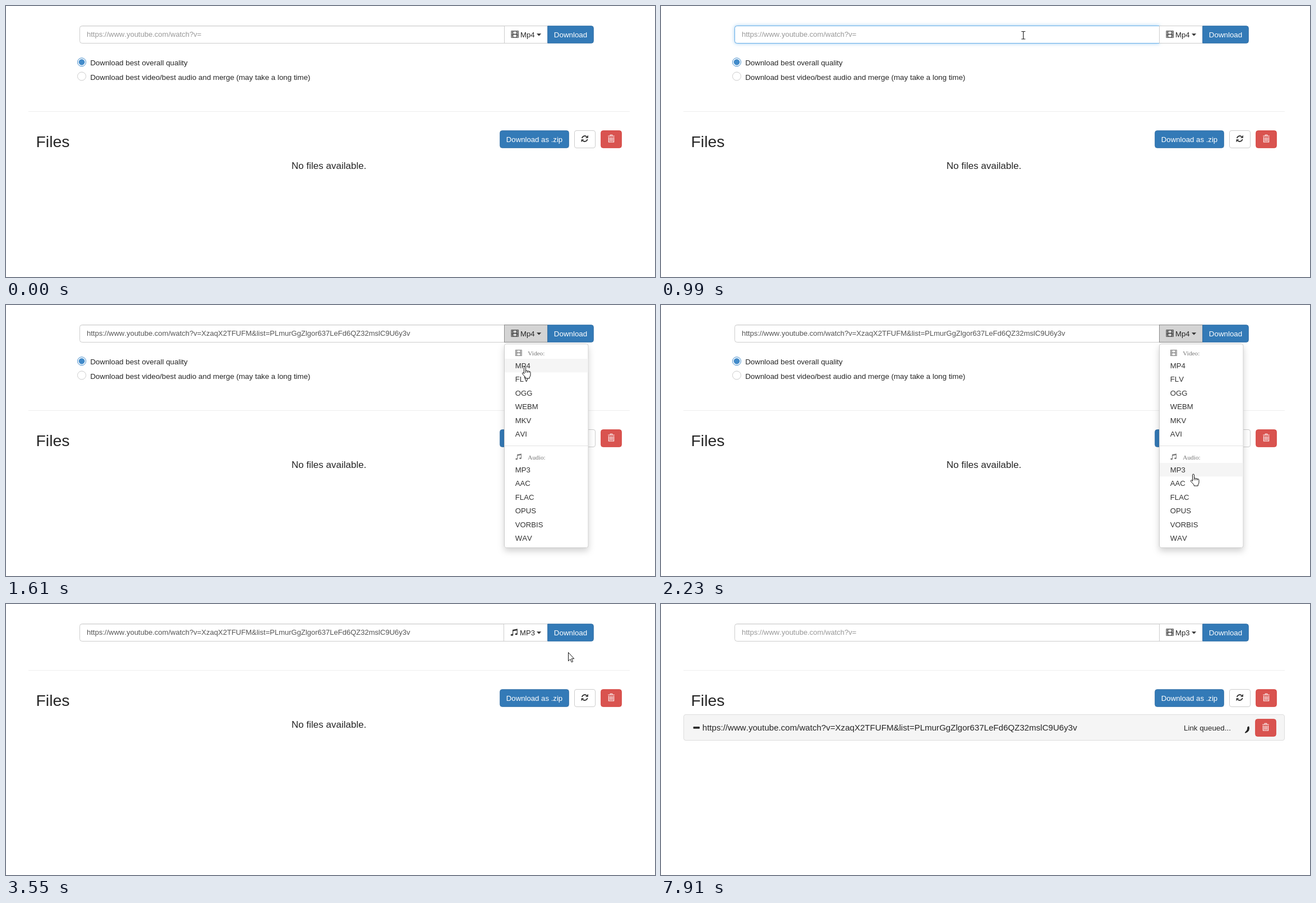
Animation, 1157 px wide and 484 px high, one loop 7.99 s. Source, as an HTML page:

```html
<!DOCTYPE html>
<html lang="en">
<head>
<meta charset="utf-8">
<title>Video downloader</title>
<style>
html, body { margin: 0; width: 100%; height: 100%; overflow: hidden; background: #fff; }
svg { display: block; width: 1157px; height: 484px; }
text { font: 13.35px "Liberation Sans", Arial, sans-serif; font-kerning: none; fill: #262626; white-space: pre; }
.mid { text-anchor: middle; }
.light { fill: #fff; }
.field { font-size: 13.03px; fill: #555; }
.field.hint { fill: #999; }
.btn { fill: #fff; stroke: #ccc; }
.btn.hover { fill: #e6e6e6; stroke: #adadad; }
.btn.open { fill: #d4d4d4; stroke: #8c8c8c; }
.primary { fill: #337ab7; stroke: #2e6da4; }
.primary.hover { fill: #286090; stroke: #204d74; }
.primary.focus { fill: #286090; stroke: #122b40; }
.danger { fill: #d9534f; stroke: #d43f3a; }
.item { font-size: 13.16px; fill: #333; }
.head { font: 11.3px "Liberation Serif", "Times New Roman", serif; fill: #777; }
.pointer { fill: #fff; stroke: #111; stroke-linejoin: round; }
</style>
</head>
<body>
<svg viewBox="0 0 1157 484">
  <defs>
    <filter id="glow" filterUnits="userSpaceOnUse" x="110" y="15" width="800" height="75">
      <feDropShadow dx="0" dy="0" stdDeviation="3.4" flood-color="#66afe9" flood-opacity=".65"/>
    </filter>
    <filter id="shade" filterUnits="userSpaceOnUse" x="860" y="50" width="210" height="430">
      <feDropShadow dx="0" dy="5.6" stdDeviation="5.6" flood-opacity=".175"/>
    </filter>
    <path id="box" d="M888.5 35.5H135.5q-4 0-4 4V62.5q0 4 4 4H888.5z"/>
    <path id="film" fill-rule="evenodd" d="M0 0H14V13H0zM4 1.2H10V5.8H4zM4 7.2H10V11.8H4zM1 1.2h1.8v1.8h-1.8zM1 4.2h1.8v1.8h-1.8zM1 7.2h1.8v1.8h-1.8zM1 10.2h1.8v1.8h-1.8zM11.2 1.2h1.8v1.8h-1.8zM11.2 4.2h1.8v1.8h-1.8zM11.2 7.2h1.8v1.8h-1.8zM11.2 10.2h1.8v1.8h-1.8z"/>
    <g id="music">
      <path d="M3.7 1.8 13 0V10H11.8V3.1L4.9 4.4V11.5H3.7z"/>
      <ellipse cx="2.6" cy="11.4" rx="2.3" ry="1.6"/>
      <ellipse cx="10.7" cy="9.9" rx="2.3" ry="1.6"/>
    </g>
    <g id="trash">
      <rect x=".75" y=".75" width="36.5" height="30.5" rx="3.5" class="danger"/>
      <g fill="none" stroke="#fff" stroke-width="1.1">
        <path d="M17.2 9.6V8.3H20.8V9.6M13.2 10.2H24.8"/>
        <path d="M14.4 12V21H23.6V12M16.8 12.5V19.6M19 12.5V19.6M21.2 12.5V19.6"/>
      </g>
    </g>
  </defs>

  <use href="#box" fill="#fff" stroke="#ccc"/>
  <path d="M134 36.5H888" stroke="#000" stroke-opacity=".05"/>
  <use href="#box" id="focus" fill="#fff" stroke="#66afe9" filter="url(#glow)"/>
  <text id="url" class="field" x="144" y="55.3"></text>
  <path id="caret" d="M721.5 43V58.5" stroke="#222"/>

  <rect id="format" class="btn" y="35.5" height="31"/>
  <use id="icon" fill="#333"/>
  <text id="kind" y="55.7" style="font-size:13.1px"></text>
  <path d="M946 49.3H954.2L950.1 53.5z" fill="#333"/>
  <path id="get" class="primary" d="M965.75 35.75H1043.75q3.5 0 3.5 3.5V62.75q0 3.5-3.5 3.5H965.75z"/>
  <text class="mid light" x="1006.5" y="55.7">Download</text>

  <g id="options">
    <circle cx="135" cy="100.3" r="7.5" fill="#fff" stroke="#428bca"/>
    <circle cx="135" cy="100.3" r="5.4" fill="#428bca"/>
    <circle cx="135" cy="125.5" r="7.5" fill="#fff" stroke="#ccc"/>
    <text x="150.2" y="106">Download best overall quality</text>
    <text x="150.2" y="131.5">Download best video/best audio and merge (may take a long time)</text>
  </g>

  <g id="files">
    <path d="M40 188.5H1112" stroke="#eee"/>
    <text x="53.5" y="252.4" style="font-size:28.4px">Files</text>
    <rect id="zip" class="primary" x="880.75" y="222.75" width="122.5" height="30.5" rx="3.5"/>
    <text class="mid light" x="942" y="242.5" style="font-size:13.2px">Download as .zip</text>
    <rect class="btn" x="1013.5" y="222.5" width="37" height="31" rx="3.5"/>
    <g transform="translate(1031.7 237)" fill="#333">
      <path d="M-4.8-.8A4.9 4.9 0 0 1 3.4-3.6M4.8.8A4.9 4.9 0 0 1-3.4 3.6" fill="none" stroke="#333" stroke-width="1.8"/>
      <path d="M6.2-6.2V-1.2H1.2zM-6.2 6.2V1.2H-1.2z"/>
    </g>
    <use href="#trash" x="1060" y="222"/>
    <text id="none" x="509" y="291.2" style="font-size:17.05px">No files available.</text>
  </g>

  <g id="queue">
    <rect x="40.5" y="197.5" width="1071" height="46" rx="3.5" fill="#f5f5f5" stroke="#ddd"/>
    <rect x="57.5" y="219" width="11.5" height="3.8" rx="1" fill="#2b2b2b"/>
    <text id="link" x="73.8" y="226.3" style="font-size:15.08px"></text>
    <text x="932" y="225.7">Link queued...</text>
    <path d="M1048.3 218.5Q1051.5 227 1041.5 230.8Q1040 229.5 1042 228Q1045.5 225 1045.2 220.5Q1046 218 1048.3 218.5z" fill="#222"/>
    <use href="#trash" x="1059" y="205"/>
  </g>

  <g id="menu">
    <rect x="888.5" y="69.5" width="149.5" height="364" rx="3.5" fill="#fff" stroke="#ccc" filter="url(#shade)"/>
    <rect id="row" x="889" width="148.5" height="24.4" fill="#f5f5f5"/>
    <path d="M889 251.5H1037.5" stroke="#e2e2e2"/>
    <use href="#film" transform="translate(908 80) scale(.84)" fill="#777"/>
    <use href="#music" transform="translate(908 265.5) scale(.84)" fill="#777"/>
    <text class="head" x="930.3" y="90">Video:</text>
    <text class="head" x="930.3" y="276">Audio:</text>
  </g>

  <g id="cursor">
    <path id="arrow" class="pointer" d="M.5.5V15.8L4 12.6 6.3 17.9 8.6 16.9 6.3 11.7H10.8z"/>
    <path id="hand" class="pointer" d="M-1.5 13V1.6a1.5 1.5 0 0 1 3 0V7.5q1.5-1.2 3 .6q1.6-1 2.8.6q2.4-.6 2.7 1.6V15q0 2-1.7 4v2H1.2V19.2L-4.4 13q-.6-2 1-2.2q1 0 1.9 1.2zM1.5 7.5V11M4.5 8.1V11M7.3 8.7V11"/>
    <path id="beam" d="M-3.5-6.5H-1Q0-6.5 0-5.5Q0-6.5 1-6.5H3.5M0-5.5V6M-3.5 7H-1Q0 7 0 6Q0 7 1 7H3.5" fill="none" stroke="#222" stroke-width="1.2"/>
  </g>
</svg>
<script>
const LOOP = 7990;
const HINT = 'https://www.youtube.com/watch?v=';
const LINK = HINT + 'XzaqX2TFUFM&list=PLmurGgZlgor637LeFd6QZ32mslC9U6y3v';
const ROW = 24.4;
const GROUPS = [[96, 'MP4 FLV OGG WEBM MKV AVI'], [282, 'MP3 AAC FLAC OPUS VORBIS WAV']];
// Moments of the story, in ms
const FOCUS = 830, PASTE = 1055, OPEN = 1400, PICK = 2925, PRESS = 3775, LEAVE = 3955, GONE = 4025, QUEUED = 7905;
// Pointer route: time, x, y
const ROUTE = [
  [200, 1133, 255], [588, 738, 64], [820, 640, 52], [1050, 648, 52], [1207, 910, 56],
  [1390, 911, 56], [1827, 941, 176], [2215, 949, 302], [2925, 949, 302], [3067, 951, 300],
  [3690, 1012, 46]
];

const el = {};
document.querySelectorAll('[id]').forEach(n => el[n.id] = n);
const show = (n, on) => n.style.display = on ? '' : 'none';
const clamp = v => Math.max(0, Math.min(1, v));
const within = (p, x, y, w, h) => p.x >= x && p.x < x + w && p.y >= y && p.y < y + h;

el.link.textContent = LINK;
for (const [top, names] of GROUPS) {
  names.split(' ').forEach((name, i) => {
    const label = document.createElementNS('http://www.w3.org/2000/svg', 'text');
    label.setAttribute('class', 'item');
    label.setAttribute('x', 907.8);
    label.setAttribute('y', top + 17 + i * ROW);
    label.textContent = name;
    el.menu.append(label);
  });
}

function pointer(t) {
  if (t >= LEAVE) return { x: 1058, y: 66 };
  // The screen is sampled about 13 times a second
  const s = Math.max(200, 200 + Math.floor((t - 200) / 77.5) * 77.5);
  const i = ROUTE.findIndex(p => p[0] > s);
  if (i < 0) return { x: ROUTE.at(-1)[1], y: ROUTE.at(-1)[2] };
  const [a, b] = [ROUTE[i - 1], ROUTE[i]];
  const u = (s - a[0]) / (b[0] - a[0]);
  const k = u * u * (3 - 2 * u);
  return { x: a[1] + (b[1] - a[1]) * k, y: a[2] + (b[2] - a[2]) * k };
}

function hoverRow(p) {
  for (const [top] of GROUPS) {
    const i = Math.floor((p.y - top) / ROW);
    if (i >= 0 && i < 6) return top + i * ROW;
  }
  return null;
}

function render(t) {
  const p = pointer(t);
  const open = t >= OPEN && t < PICK;
  const audio = t >= PICK;
  const queued = t >= QUEUED;
  const music = audio && !queued;
  const pasted = t >= PASTE && !queued;

  const lit = clamp((t - FOCUS) / 150) * (1 - clamp((t - OPEN) / 150));
  el.focus.style.opacity = lit;
  show(el.focus, lit > 0);
  show(el.caret, pasted && t < OPEN);
  el.url.textContent = pasted ? LINK : HINT;
  el.url.setAttribute('class', pasted ? 'field' : 'field hint');

  const left = music ? 887.5 : 888.5;
  const onFormat = within(p, 888, 35, 77, 32);
  el.format.setAttribute('x', left);
  el.format.setAttribute('width', 965.5 - left);
  el.format.setAttribute('class', 'btn' + (open ? ' open' : onFormat && t < OPEN ? ' hover' : ''));
  el.icon.setAttribute('href', music ? '#music' : '#film');
  el.icon.setAttribute('transform', `translate(${left + 12} 44.3) scale(.95)`);
  el.kind.setAttribute('x', left + 28.6);
  el.kind.textContent = music ? 'MP3' : queued ? 'Mp3' : 'Mp4';
  el.get.setAttribute('class', 'primary' + (t >= PRESS && !queued ? ' focus' : ''));

  const onZip = audio && t < LEAVE && within(p, 880, 152, 124, 32);
  el.zip.setAttribute('class', 'primary' + (onZip ? ' hover' : ''));
  show(el.options, !audio);
  el.files.setAttribute('transform', `translate(0 ${audio ? -70 : 0})`);
  show(el.none, !queued);
  show(el.queue, queued);

  show(el.menu, open);
  const row = open ? hoverRow(p) : null;
  show(el.row, row !== null);
  if (row !== null) el.row.setAttribute('y', row);

  const beam = within(p, 132, 35, 756, 32);
  const hand = onFormat || onZip || row !== null || within(p, 965, 35, 83, 32);
  show(el.cursor, t >= 205 && t < GONE);
  show(el.beam, beam);
  show(el.hand, hand);
  show(el.arrow, !beam && !hand);
  el.cursor.setAttribute('transform', `translate(${Math.round(p.x)} ${Math.round(p.y)})`);
}

const start = performance.now();
function tick() {
  render((performance.now() - start) % LOOP);
  requestAnimationFrame(tick);
}
tick();
</script>
</body>
</html>
```
